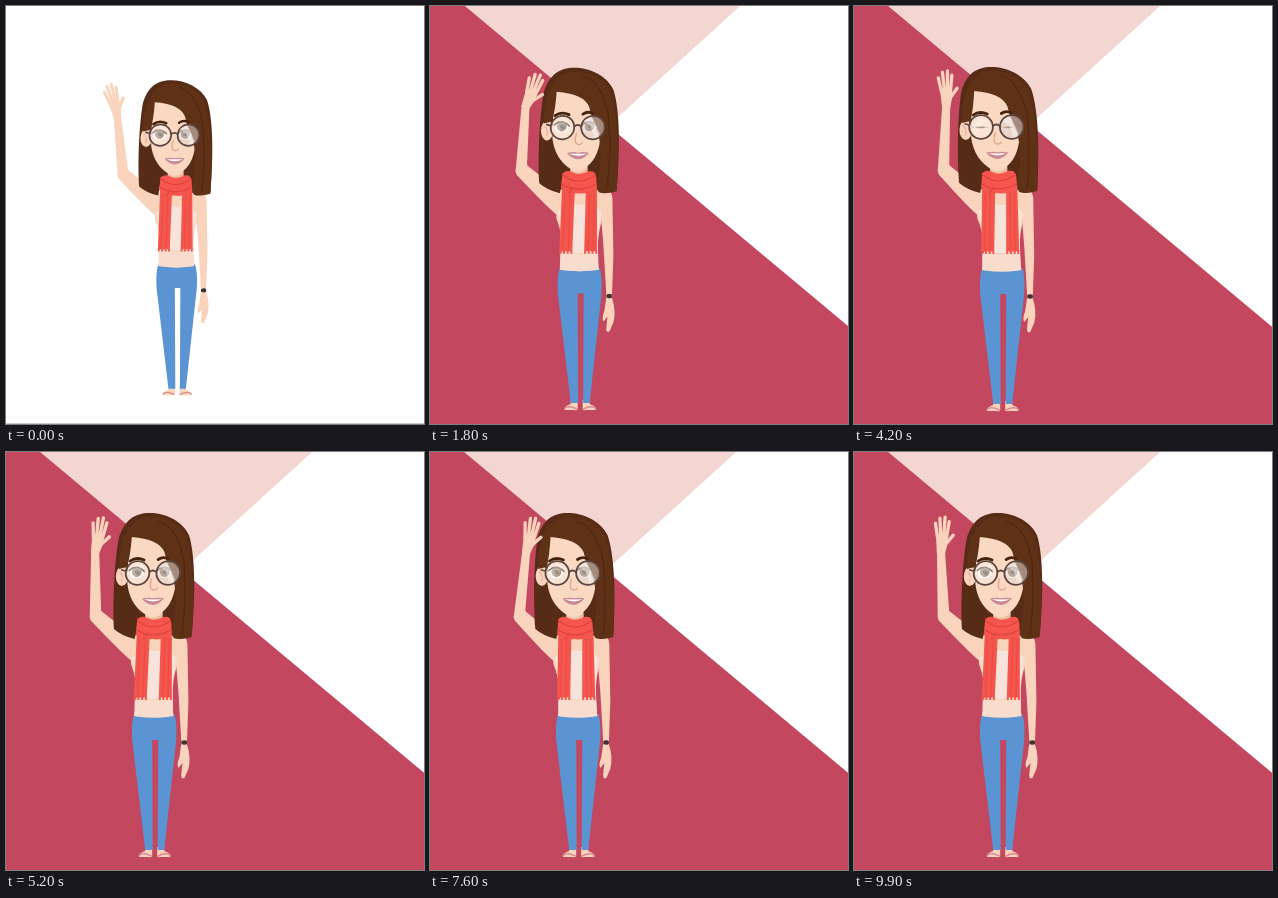
Write an HTML page that moves like this. It is 418x418 px and loops after 10 s.

```html
<!DOCTYPE html>
<html lang="en">
<head>
<meta charset="utf-8">
<title>Waving woman</title>
<style>
  html, body { margin: 0; width: 100%; height: 100%; overflow: hidden; background: #fff; }
  svg { display: block; width: 100vw; height: 100vh; }
  .skin { fill: #f9d3bc; }
  .line { fill: none; stroke-linecap: round; stroke-linejoin: round; }
</style>
</head>
<body>
<svg viewBox="0 0 418 418">
  <path d="M0 417.5H418" stroke="#c9c9c9"/>
  <path id="light" d="M-600 -40H350L-216 475H-600Z" fill="#f3d5d2"/>
  <path id="dark" d="M-445 -401L514 400V900H-445Z" fill="#c3475f"/>

  <g id="woman">
    <!-- feet and jeans -->
    <path class="skin" d="M140 395H147V404Q147 406 143 405H134Q132 402 140 399ZM152 395H159V399Q167 402 165 405H155Q152 406 152 404Z"/>
    <path d="M134 403.500Q138 400 146 404M165 403.500Q161 400 153 404" class="line" stroke="#d98a92" stroke-width="1.500"/>
    <path d="M129 262H169Q172 270 171 288L159 398H152.500L153 288H147L147.500 398H140L127 288Q126 270 129 262Z" fill="#5b94d3"/>

    <path id="upperArm" class="skin"/>
    <g id="rightArm">
      <path class="skin" d="M166 181Q179 180 180 192L181 250L179.500 292Q184 306 181 317L177 326Q173 328 174 321L175 311L171 316Q169 313 172 305L174 291L171 240L168 204Z"/>
      <path d="M174 290.500H179.500" stroke="#554039" stroke-width="3.500"/>
      <circle cx="177" cy="290.500" r="2.300" fill="#3d3431"/>
    </g>

    <g id="lean">
      <path class="skin" d="M124 185Q145 176 169 184L171 212Q164 230 168 264Q149 267 129 264Q134 235 124 212Z"/>
      <path d="M125 205Q132 203 133 194Q148 204 163 194Q164 202 170 207Q165 225 167 247H131Q131 225 125 205Z" fill="#f7e3da"/>
      <path d="M129 247Q149 250 167 247L168 264Q149 267 129 264Z" fill="#f8ddcf"/>

      <!-- hair behind the face -->
      <path d="M106 177C104 155 104 112 108 86C113 68 123 61 138 61C154 61 171 69 178 83C186 106 186 150 184 183Q175 189 166 186L160 168H130L127 187Q114 184 106 177Z" fill="#572c17"/>
      <path class="skin" d="M137 155H154V180H137Z"/>
      <path d="M137 163Q146 170 154 161V169Q145 173 137 169Z" fill="#ecbba2"/>
      <ellipse class="skin" cx="112.500" cy="124" rx="6.300" ry="10"/>
      <path d="M110 120Q114 123 112 129" class="line" stroke="#e5ae95"/>
      <path fill="#fad8c2" d="M118 84H160L167 120Q167 146 157 157Q146 169 136 162Q121 152 118 132Z"/>
      <!-- fringe and right lock -->
      <path d="M109 117Q108 72 134 65Q162 63 175 84Q187 120 184 185Q172 189 163 183Q170 152 164 127Q158 115 154 100Q148 87 121 85Q120 105 117 115Z" fill="#5f3117"/>
      <path d="M147 69Q168 76 174 111Q178 150 174 183" class="line" stroke="#502712" stroke-width="1.200"/>

      <!-- features -->
      <path d="M120 109Q126 104.500 134 108M148 107.500Q153 104 158 107" class="line" stroke="#46230f" stroke-width="2.800"/>
      <g id="eyes">
        <g id="eye">
          <ellipse cx="127" cy="0" rx="7" ry="5.500" fill="#fff"/>
          <circle cx="127" cy="-.5" r="5" fill="#8d7057"/>
          <circle cx="127" cy="-.5" r="2.200" fill="#42332b"/>
          <path d="M119.500 -2Q127 -9 134.500 -1" class="line" stroke="#51362a" stroke-width="1.400"/>
        </g>
        <use href="#eye" x="28"/>
      </g>
      <path d="M142 127Q139 137 144 138Q147 138.500 148 136" class="line" stroke="#dfa58b" stroke-width="1.300"/>
      <path d="M133 146.500Q140 145 144 146.300Q150 145 155 146.500Q150 153 144 153Q137 152 133 146.500Z" fill="#c98a96"/>
      <path d="M135 147.300Q145 147.500 153 147.300Q145 151.500 135 147.300Z" fill="#fff"/>
      <g stroke="#5b4640" stroke-width="1.800">
        <circle cx="127.800" cy="121" r="11.800" fill="#fff" fill-opacity=".3"/>
        <circle cx="158.500" cy="121" r="11.800" fill="#e0d6d0" fill-opacity=".55"/>
        <path class="line" d="M139.600 120Q143 117 146.700 120M116 119L112 118"/>
      </g>
      <path d="M157 121L149 114Q153 111 158 111.500L166 128Q163 131 160 132Z" fill="#fff" opacity=".4"/>
      <path d="M120 119L128 112L134 114L122 128Z" fill="#fff" opacity=".25"/>

      <!-- scarf -->
      <path d="M129 180H142L141 245.500H128ZM153 180H164L166 245.500H153Z" fill="#f4554c"/>
      <path d="M132 187L131.500 245M137.500 187L137 245M157 187V245M161.500 187L162 245" stroke="#e84b45"/>
      <path d="M128 246.500H141.500M153 246.500H166.500" stroke="#f4554c" stroke-width="3" stroke-dasharray="2 1.700"/>
      <path d="M129 167Q134 163 139 166Q146 170 155 165Q162 164 163 170L164 181Q155 189 145 187Q133 189 128 181Z" fill="#f4554c"/>
      <path d="M130 169Q145 181 162 169M129 178Q144 188 163 178M140 181L136 187" class="line" stroke="#dd423e" stroke-width="1.200"/>
    </g>

    <path id="forearm" class="skin"/>
    <g id="hand" class="line" stroke="#f9d3bc" stroke-width="3.300">
      <path class="skin" stroke="none" d="M-4 2L-6.500 -15Q-1 -22 5 -17L6 -10L4 2Z"/>
      <path d="M-5 -14L-8.500 -28M-2 -16L-4.500 -33.500M1 -17L.5 -35M4 -15L5 -31M3 -7L10.500 -18"/>
    </g>
  </g>
</svg>
<script>
const LOOP = 10000, STEP = 100, WAVE = 2000 / 3;
const $ = id => document.getElementById(id);
const set = (id, value, name = 'transform') => $(id).setAttribute(name, value);
const clamp = x => Math.max(0, Math.min(1, x));
const span = (t, from, to) => clamp((t - from) / (to - from));
const easeOut = u => 1 - (1 - u) ** 3;
const easeInOut = u => u < .5 ? 2 * u * u : 1 - 2 * (1 - u) ** 2;
const swing = (t, peak) => Math.cos(2 * Math.PI * (t - peak) / WAVE);

// Both panels sweep in, overshoot a little, then settle.
function drawBackground(t) {
  const arrive = 1 - easeOut(span(t, 0, 1100));
  const settle = 1 - easeInOut(span(t, 1100, 2200));
  set('dark', `translate(${3 * settle - 1 - 330 * arrive} ${400 * arrive})`);
  set('light', `translate(${15 * settle - 480 * arrive} 0)`);
}

function drawWoman(t) {
  const far = 1 - easeInOut(span(t, 0, 2200));
  set('woman', `translate(${35 * far - .8} ${18.3 * far}) scale(${1 - .084 * far})`);

  const k = 2.3 * (1 + swing(t, 550)) / 145;
  const shoulder = 70 * k;
  set('lean', `matrix(1 0 ${-k} 1 ${265 * k} 0)`);
  set('rightArm', `translate(${shoulder} 0)`);

  const wrist = 91.5 + 7.5 * swing(t, 345);
  const angle = 7 + 22 * swing(t, 395);
  set('upperArm', `M84.500 165Q90 155 96 159L${127 + shoulder} 185V211Q${120 + shoulder} 207 86 169Z`, 'd');
  set('forearm', `M84.500 165L${wrist - 4} 99H${wrist + 4}L96 160Q92 173 85.500 168Z`, 'd');
  set('hand', `translate(${wrist} 100) rotate(${angle})`);

  const lid = clamp(1.4 - Math.abs(t % 2000 - 200) / 120);
  set('eyes', `translate(0 ${120.5 + lid}) scale(1 ${1 - .85 * lid})`);
}

function frame(now) {
  const t = Math.floor(now % LOOP / STEP) * STEP;
  drawBackground(t);
  drawWoman(t);
  requestAnimationFrame(frame);
}
frame(0);
</script>
</body>
</html>
```
